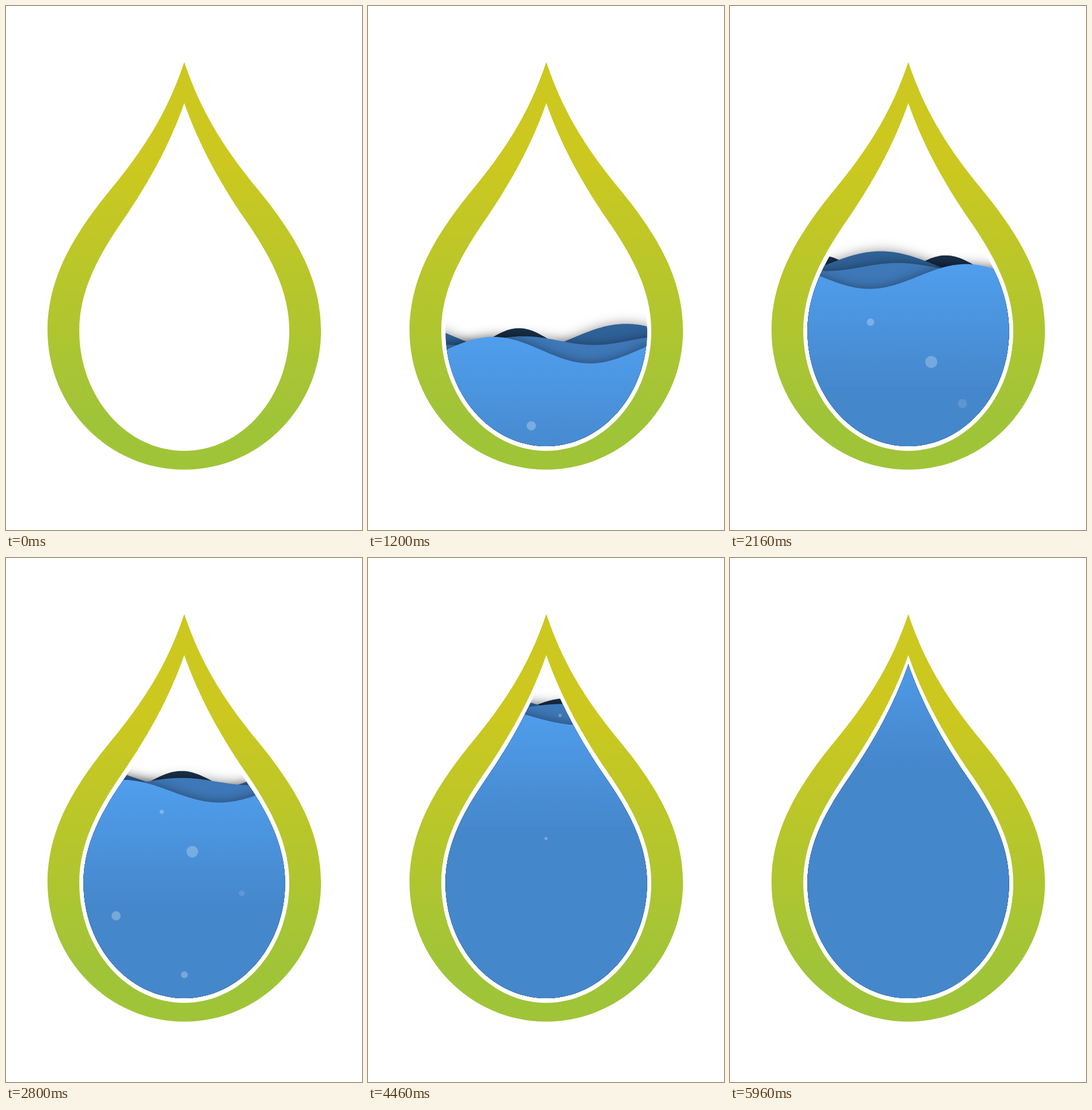
An HTML page with a canvas for the animation above (6000 ms loop, 617 px wide and 907 px high).

```html
<!DOCTYPE html>
<html lang="en">
<head>
<meta charset="utf-8">
<title>Filling drop</title>
<style>
  html, body { margin: 0; width: 100%; height: 100%; overflow: hidden; background: #fff; }
  canvas { display: block; width: 617px; height: 907px; }
</style>
</head>
<body>
<canvas id="stage" width="617" height="907"></canvas>
<script>
const ctx = document.getElementById('stage').getContext('2d');
const W = 617, H = 907, LOOP = 6000, MID = 309, TAU = 2 * Math.PI;

// A drop from the right-hand side of its outline, mirrored around MID.
function drop(tip, shoulder, side, bottom) {
  const [[ax, ay], [bx, by], [sx, sy]] = shoulder;
  const [[cx, cy], [dx, dy], [ex, ey]] = side;
  const k = 0.552;
  const path = new Path2D();
  for (const s of [1, -1]) {
    const m = x => MID + s * (x - MID);
    path.moveTo(MID, tip);
    path.bezierCurveTo(m(ax), ay, m(bx), by, m(sx), sy);
    path.bezierCurveTo(m(cx), cy, m(dx), dy, m(ex), ey);
    path.bezierCurveTo(m(ex), ey + k * (bottom - ey), m(MID + k * (ex - MID)), bottom, MID, bottom);
    path.closePath();
  }
  return path;
}

const outer = drop(97, [[340, 190], [385, 255], [437, 318]], [[500, 395], [546, 470], [546, 562]], 802.5);
const inner = drop(168, [[334, 240], [372, 308], [414, 369]], [[455, 428], [491, 490], [491, 562]], 770);

// The water body is the inner drop, slightly shrunk.
const water = new Path2D();
water.addPath(inner, new DOMMatrix().translate(MID, 569).scale(0.96).translate(-MID, -569));

function fade(y1, color1, y2, color2) {
  const fill = ctx.createLinearGradient(0, y1, 0, y2);
  fill.addColorStop(0, color1);
  fill.addColorStop(1, color2);
  return fill;
}
const ringFill = fade(273, '#ccc81f', 710, '#a0c438');

// Back to front; crest is the x of a peak at 1600 ms, speed in px per ms.
const waves = [
  { rise: 17, amp: 21, length: 217, crest: 218, speed: -0.109, color: '#18304a' },
  { rise: 19.5, amp: 26, length: 385, crest: 370, speed: -0.194, color: '#2f6299' },
  { rise: 16.5, amp: 7.5, length: 245, crest: 278, speed: 0.022, color: '#3e78b8' },
  { rise: 0, amp: 23, length: 335, crest: 297, speed: 0.2 }
];

// start: depth at time zero; sway: sideways swing in radii; end: time when shrunk away.
const bubbles = [
  { x: 259, start: 981, size: 8, sway: -3, end: 3650, alpha: 0.27 },
  { x: 337, start: 1050, size: 10.5, sway: 1.4, end: 5150, alpha: 0.25 },
  { x: 406, start: 1122, size: 8, sway: -0.5, end: 4000, alpha: 0.12 },
  { x: 186, start: 1161, size: 8, sway: -0.6, end: 5200, alpha: 0.27 },
  { x: 308, start: 1263, size: 6, sway: -0.2, end: 5090, alpha: 0.27 }
];

// Fast filling that settles to a steady rise, with a last push into the tip.
const levelAt = t => 474 - 0.05 * t + 373 * Math.exp(-t / 1670) - 30 * (t / LOOP) ** 8;
const calmAt = t => Math.min(1, 1 - (t - 1600) * 0.00012);
const climbAt = t => 0.2256 * t - 0.0000115 * t * t;

function drawWave({ rise, amp, length, crest, speed, color }, t) {
  const height = amp * calmAt(t);
  const mean = levelAt(t) - rise;
  const peak = crest + speed * (t - 1600);
  ctx.beginPath();
  ctx.moveTo(0, H + 60);
  for (let x = 0; x <= W; x += 3) {
    ctx.lineTo(x, mean - height * Math.cos(TAU * (x - peak) / length));
  }
  ctx.lineTo(W, H + 60);
  ctx.closePath();
  ctx.fillStyle = color || fade(mean - height, '#509eed', mean + 200, '#4587cb');
  ctx.fill();
}

function drawBubble({ x, start, size, sway, end, alpha }, t) {
  const r = Math.min(size, (end - t) * 0.0043);
  if (r <= 0) return;
  const swing = -Math.cos(TAU * (t - 2800) / 1600);
  ctx.beginPath();
  ctx.arc(x + sway * r * swing, start - climbAt(t), r, 0, TAU);
  ctx.fillStyle = `rgba(255,255,255,${alpha})`;
  ctx.fill();
}

function fillPath(path, style) {
  ctx.fillStyle = style;
  ctx.fill(path);
}

function draw(t) {
  ctx.clearRect(0, 0, W, H);
  fillPath(outer, ringFill);
  fillPath(inner, '#fff');

  ctx.save();
  ctx.clip(water);
  waves.forEach((wave, i) => {
    // Every layer but the rearmost casts a soft shadow behind it.
    ctx.shadowColor = i ? 'rgba(0,0,0,0.42)' : 'transparent';
    ctx.shadowBlur = 20;
    drawWave(wave, t);
  });
  ctx.shadowColor = 'transparent';
  bubbles.forEach(bubble => drawBubble(bubble, t));
  ctx.restore();
}

function tick() {
  draw(performance.now() % LOOP);
  requestAnimationFrame(tick);
}
draw(0);
requestAnimationFrame(tick);
</script>
</body>
</html>
```
